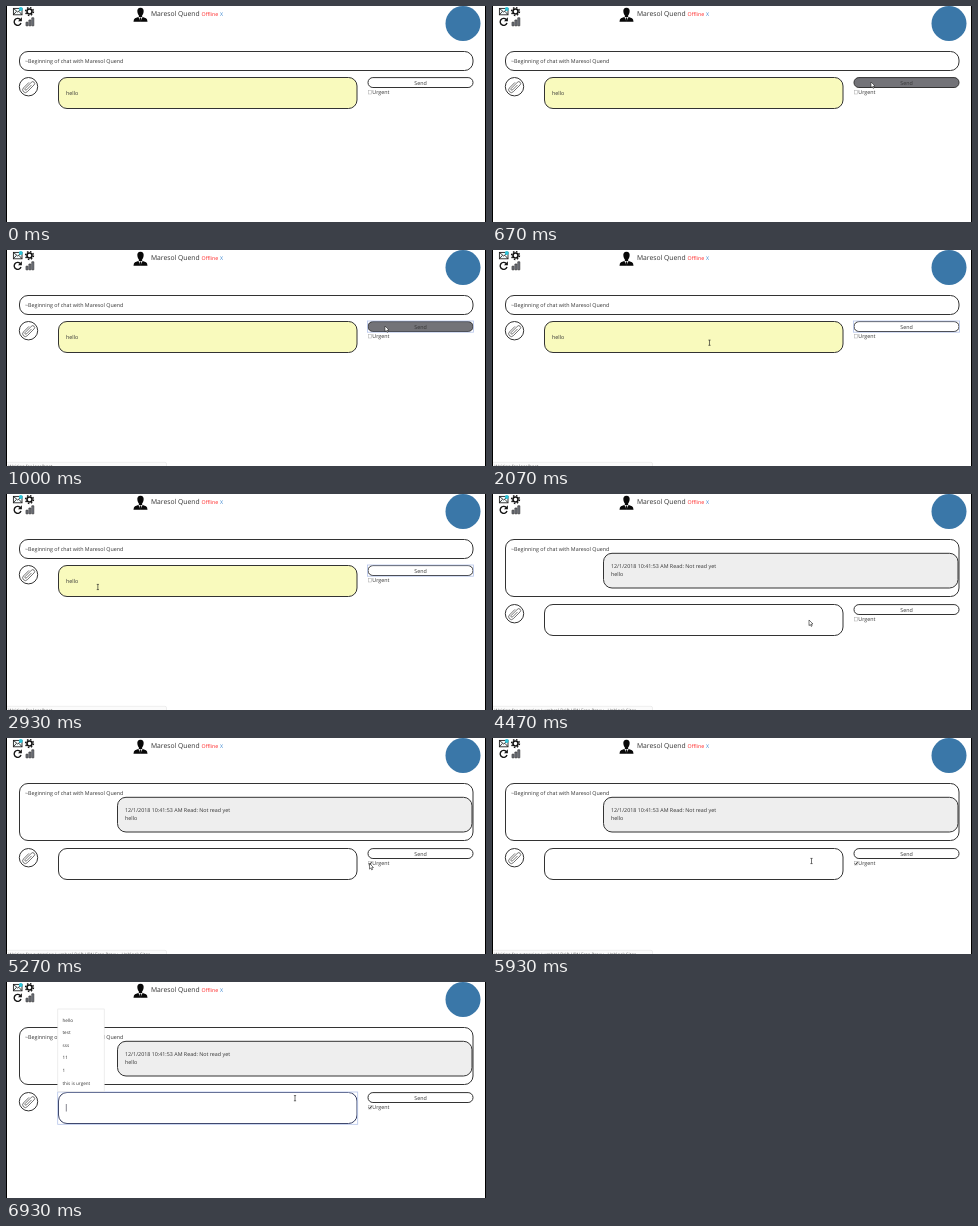
Animation, 480 px wide and 216 px high, one loop 7070 ms. Source, as an HTML page:

```html
<!DOCTYPE html>
<html lang="en">
<head>
<meta charset="utf-8">
<title>Chat demo</title>
<style>
  html, body { margin: 0; width: 100%; height: 100%; overflow: hidden; background: #fff; }
  svg { display: block; width: 480px; height: 216px; }
  text { font: 5.35px "Open Sans", "Noto Sans", sans-serif; fill: #333; text-rendering: geometricPrecision; white-space: pre; }
  .box { fill: #fff; stroke: #333; stroke-width: 1; }
  .focus { fill: none; stroke: #b4c4ea; stroke-width: .8; }
  .line { fill: none; stroke: #151515; }
  .small { font-size: 4.6px; }
</style>
</head>
<body>
<svg viewBox="0 0 480 216">
  <rect width="480" height="216" fill="#fff"/>

  <!-- toolbar -->
  <rect x="7.4" y="2.4" width="8.6" height="6.4" fill="#f4fbfc" stroke="#222" stroke-width=".9"/>
  <path d="M7.6 2.6L11.7 6L15.8 2.6M7.6 8.6L10.4 5.4M15.8 8.6L13 5.4" class="line" stroke-width=".8"/>
  <circle cx="14.8" cy="3" r="1.9" fill="#2cc4d8"/>
  <circle cx="23.5" cy="5.5" r="2.5" class="line" stroke-width="1.6"/>
  <circle cx="23.5" cy="5.5" r="3.9" class="line" stroke-width="1.5" stroke-dasharray="1.5 1.563"/>
  <path d="M14.2 13.4A3.5 3.5 0 1 0 15 17" class="line" stroke-width="1.4"/>
  <path d="M15.9 11.2V15.2H12Z" fill="#151515"/>
  <path d="M20 16.2h2v3.6h-2zM22.9 14h2v5.8h-2zM25.8 11.8h2v8h-2z" fill="#777b86" stroke="#333" stroke-width=".7"/>

  <!-- contact -->
  <path d="M134.5 1.7C137 1.7 138 3.4 137.6 6C137.3 8 136.6 9 136.1 9.6V10.8L140 12.2Q141.4 12.8 141.5 15.7H127.5Q127.6 12.8 129 12.2L132.9 10.8V9.6C132.4 9 131.7 8 131.4 6C131 3.4 132 1.7 134.5 1.7Z" fill="#080808"/>
  <path d="M132.4 11L134.5 15.6L136.6 11Z" fill="#eee"/>
  <path d="M134 11.5h1l.5 2.6-1 1.5-1-1.5z" fill="#111"/>
  <text x="145" y="10.4" style="font-size:6.77px">Maresol Quend</text>
  <text x="195.6" y="10.4" style="font-size:5.25px;fill:#f22">Offline</text>
  <text x="214" y="10.4" style="font-size:5.25px;fill:#3a86d0">X</text>
  <circle cx="457" cy="17.5" r="17.5" fill="#3a77a8"/>

  <!-- conversation -->
  <rect id="chat" class="box" x="13.5" y="45.5" width="453.5" height="19" rx="8.5"/>
  <text x="19" y="57.3">~Beginning of chat with Maresol Quend</text>
  <g id="message">
    <rect class="box" x="111.5" y="59.3" width="354.5" height="34.7" rx="8.5" style="fill:#eee"/>
    <text x="119" y="73.6">12/1/2018 10:41:53 AM Read: Not read yet</text>
    <text x="119" y="82">hello</text>
  </g>

  <!-- composer -->
  <g id="composer">
    <circle cx="22.5" cy="80.7" r="9.2" class="box"/>
    <g transform="translate(22.5 80.7) rotate(45)" fill="none" stroke="#444" stroke-width=".7">
      <path d="M-2.7 -3.4V4.4A2.7 2.7 0 0 0 2.7 4.4V-5.2A1.9 1.9 0 0 0 -1.1 -5.2V3.6A1 1 0 0 0 .9 3.6V-3.4"/>
    </g>
    <rect id="input" class="box" x="52.5" y="71.5" width="298.5" height="31" rx="8.5"/>
    <text id="draft" x="60" y="89.4">hello</text>
    <rect id="send" class="box" x="362" y="71.6" width="105" height="9.9" rx="4.9"/>
    <text x="414.5" y="78.8" text-anchor="middle">Send</text>
    <rect id="sendFocus" class="focus" x="361.4" y="71" width="106.2" height="11.2"/>
    <rect x="362.4" y="84.7" width="3.3" height="3.3" fill="#fff" stroke="#aaa" stroke-width=".5"/>
    <path id="check" d="M362.8 86.4L363.8 87.6L365.6 84.9" class="line" stroke-width=".8"/>
    <text x="366.3" y="88.4">Urgent</text>
    <g id="inputFocus">
      <rect class="focus" x="51.7" y="71" width="300" height="32.3"/>
      <path d="M60.3 83V90.5" stroke="#334" stroke-width=".6"/>
    </g>
  </g>

  <g id="history">
    <rect x="51.8" y="27" width="46.4" height="82.5" fill="#fff" stroke="#e2e2e2" stroke-width=".6"/>
  </g>

  <g id="status">
    <path d="M0 216V212.3H159Q160.5 212.3 160.5 214V216" fill="#fbfbfb" stroke="#ddd" stroke-width=".5"/>
    <text id="statusText" class="small" x="2.5" y="217.8" style="fill:#666"></text>
  </g>

  <path d="M0 0H1V216H0ZM479 0H480V216H479Z" fill="#000"/>

  <g id="pointer">
    <path id="arrow" d="M0 0V5.6L1.3 4.5L2.2 6.4L3.1 6L2.3 4.1L4 4Z" fill="#fff" stroke="#222" stroke-width=".6"/>
    <path id="beam" d="M-1.1 -2.6H1.1M0 -2.6V2.6M-1.1 2.6H1.1" class="line" stroke-width=".6"/>
  </g>
</svg>
<script>
const LOOP = 7070;
const $ = id => document.getElementById(id);
const show = (id, on) => $(id).style.display = on ? "" : "none";

["hello", "test", "sss", "11", "1", "this is urgent"].forEach((word, i) => {
  const item = document.createElementNS("http://www.w3.org/2000/svg", "text");
  item.textContent = word;
  item.setAttribute("class", "small");
  item.setAttribute("x", 56.5);
  item.setAttribute("y", 39.5 + i * 12.6);
  $("history").append(item);
});

// time, x, y
const path = [
  [70, 392, 192], [600, 379, 76], [1400, 379, 76], [2070, 217.5, 92.7],
  [2900, 92, 93], [3530, 70.5, 93], [4000, 70.5, 93], [4470, 317, 126],
  [4800, 363.5, 125.5], [5270, 363.5, 125.5], [5800, 319.5, 123],
  [5950, 319.5, 123], [6500, 291, 116], [6730, 289, 116.2], [LOOP, 289, 116.2]
];

function pointerAt(t) {
  const i = Math.max(1, path.findIndex(p => p[0] >= t));
  const [t0, x0, y0] = path[i - 1], [t1, x1, y1] = path[i];
  const u = Math.max(0, (t - t0) / (t1 - t0));
  const k = u * u * (3 - 2 * u);
  return [x0 + (x1 - x0) * k, y0 + (y1 - y0) * k];
}

function draw(t) {
  const sent = t >= 4200;
  const [x, y] = pointerAt(t);
  const hover = !sent && x > 362 && y > 71 && y < 82;
  const beam = (t > 1470 && t < 3000) || (t > 5270 && x < 351);

  $("chat").setAttribute("height", sent ? 57 : 19);
  $("composer").setAttribute("transform", `translate(0 ${sent ? 39 : 0})`);
  $("input").style.fill = sent ? "#fff" : "#f9fabd";
  $("input").style.stroke = t >= 6870 ? "#333c60" : "";
  $("send").style.fill = hover ? "#737378" : "#fff";
  show("message", sent);
  show("draft", !sent);
  show("sendFocus", t >= 930 && !sent);
  show("check", t >= 5000);
  show("inputFocus", t >= 6870);
  show("history", t >= 6870);

  show("status", t >= 1000 && t < 6200);
  $("statusText").textContent = t < 3730 ? "Waiting for localhost..."
    : "Waiting for extension Lumbrel Drift VPN Free Proxy - Unblock Sites...";

  show("pointer", t >= 70);
  show("arrow", !beam);
  show("beam", beam);
  $("pointer").setAttribute("transform", `translate(${x} ${y})`);
}

function tick() {
  draw(performance.now() % LOOP);
  requestAnimationFrame(tick);
}
tick();
</script>
</body>
</html>
```
